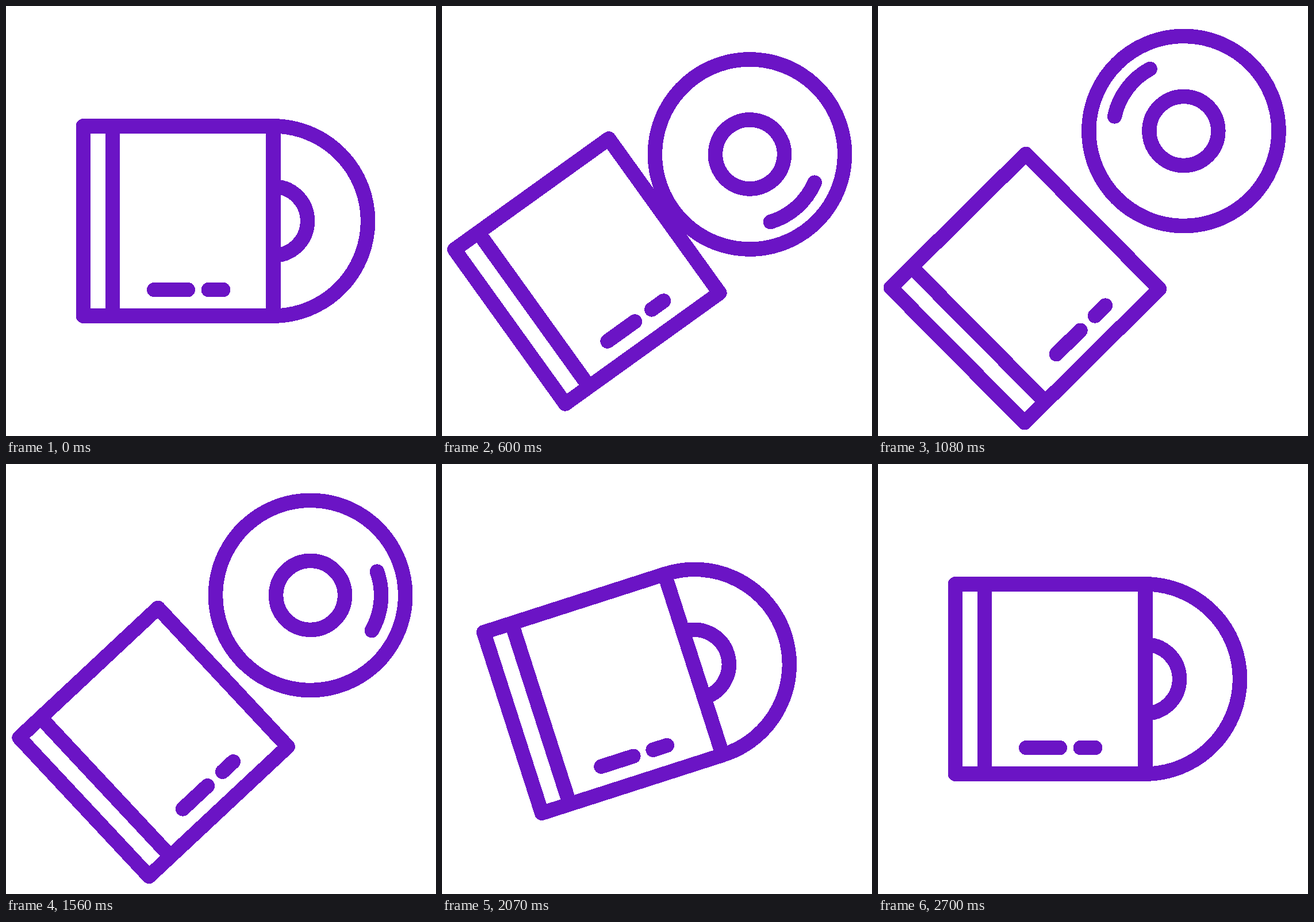
Animation, 748 px wide and 748 px high, one loop 5.73 s. Source, as an HTML page:

```html
<!DOCTYPE html>
<html lang="en">
<head>
<meta charset="utf-8">
<title>Disc and case</title>
<style>
  html, body { margin: 0; width: 100%; height: 100%; overflow: hidden; background: #fff; }
  svg { display: block; width: 100%; height: 100%; shape-rendering: crispEdges; }
  g { fill: none; stroke: #6b14c5; stroke-width: 25.5; stroke-linecap: round; stroke-linejoin: round; }
</style>
</head>
<body>
<svg viewBox="0 0 748 748">
  <g transform="translate(374 374)">
    <g id="all">
      <g id="disc">
        <g transform="translate(90.5 0)">
          <circle r="165.1"/>
          <circle r="60"/>
          <path id="shine" d="M111.75 -51.4A123 123 0 0 1 111.75 51.4"/>
        </g>
      </g>
      <g id="box">
        <g transform="translate(-74.3 0)">
          <rect x="-165.2" y="-165.2" width="330.4" height="330.4" fill="#fff"/>
          <path d="M-114.2 -165V165M-42 119.6H16.6M52.6 119.6H78"/>
        </g>
      </g>
    </g>
  </g>
</svg>
<script>
const LOOP = 5730, STEP = 30, MOVE = 2700, OPEN = 1200;

const bezier = (...p) => `cubic-bezier(${p})`;
const slide = bezier(.25, .02, .18, 1);
const lean = bezier(.32, 0, .2, 1);
const swingBack = bezier(.91, 0, .325, 1.4);
const cubicIn = bezier(.33, 0, .67, 0);
const spin = bezier(.3, .37, .54, .9);

// Each step: time in ms, value, easing towards the next step.
function track(id, prop, unit, steps) {
  const frames = steps.map(([ms, value, easing = "linear"]) =>
    ({ offset: ms / MOVE, [prop]: value + unit, easing }));
  const anim = document.getElementById(id).animate(frames, { duration: MOVE, fill: "both" });
  anim.pause();
  return anim;
}

const tracks = [
  track("all", "rotate", "deg", [[0, 0, lean], [OPEN, -45, swingBack], [MOVE, 0]]),
  track("all", "translate", "px", [[0, 0], [1830, 0, "ease-out"], [2160, -16, "ease-in-out"], [MOVE, 0]]),
  track("box", "translate", "px", [[0, 0, slide], [OPEN, -92.4, cubicIn], [2100, 0], [MOVE, 0]]),
  track("disc", "translate", "px", [[0, 0, slide], [OPEN, 132.5, cubicIn], [2070, -7, "ease-out"], [2400, 0], [MOVE, 0]]),
  track("shine", "rotate", "deg", [[0, -135, spin], [MOVE, 585]])
];

const start = performance.now();
function tick() {
  const now = (performance.now() - start) % LOOP;
  const t = Math.floor(now / STEP) * STEP;
  for (const anim of tracks) anim.currentTime = t;
  requestAnimationFrame(tick);
}
tick();
</script>
</body>
</html>
```
